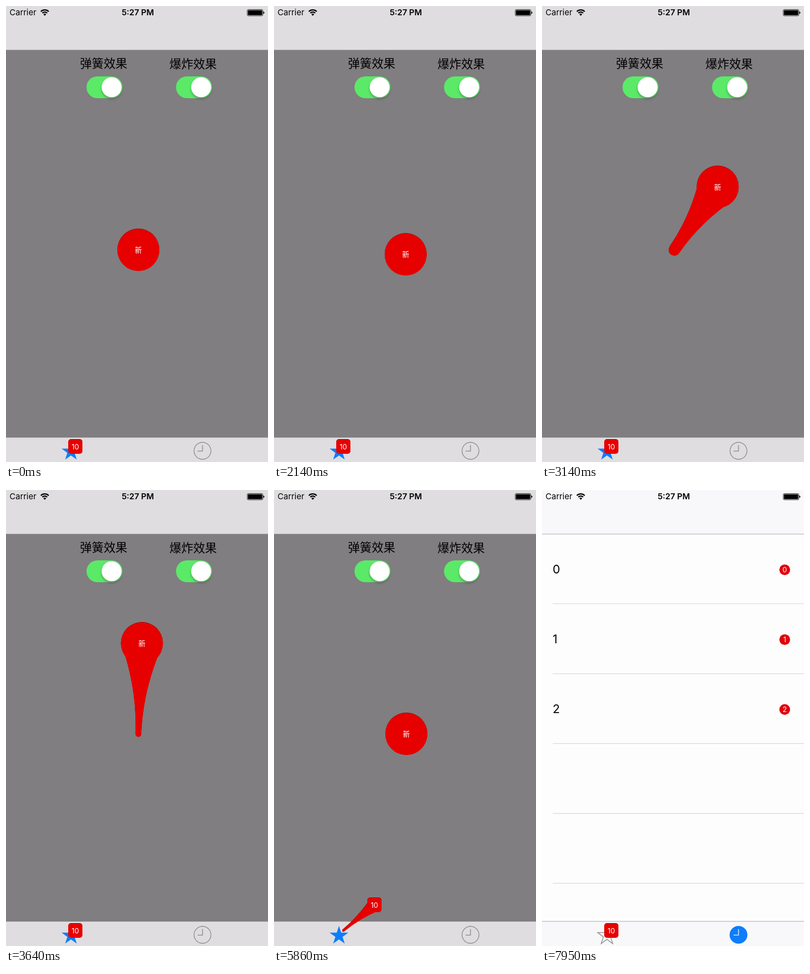
These frames come from a looping animation (480x836 px, 8 s). An HTML page:

```html
<!DOCTYPE html>
<html lang="zh">
<head>
<meta charset="utf-8">
<style>
html, body { margin: 0; height: 100%; overflow: hidden; background: #807e80; }
svg { display: block; width: 100vw; height: 100vh; }
text { font-family: Inter, "Noto Sans CJK SC", "Noto Sans CJK", sans-serif; }
.label { font-size: 21.7px; }
.small { font-size: 13px; fill: #fff; text-anchor: middle; }
.thin { font-weight: 300; }
.red { fill: #e60000; filter: drop-shadow(.6px -.6px 0 #a80000); }
.knob { fill: #fff; filter: drop-shadow(0 3px 2px #0004); }
.icon { fill: none; stroke: #929194; stroke-width: 1.4; }
.on { fill: #0e7dfb; }
</style>
</head>
<body>
<svg viewBox="0 0 480 836">
  <defs>
    <path id="star"/>
    <g id="switch">
      <rect width="66" height="40" rx="20" fill="#5bea68"/>
      <circle class="knob" cx="46" cy="20" r="18.3"/>
    </g>
    <path id="hands" d="M360 805V816H351" fill="none" stroke-width="1.5"/>
  </defs>

  <g id="home">
    <rect width="480" height="836" fill="#807e80"/>
    <path d="M0 0H480V80.5H0ZM0 791.3H480V836H0Z" fill="#dfdde0"/>
    <text class="label" x="135.5" y="112.5">弹簧效果</text>
    <text class="label" x="299.5" y="113.5">爆炸效果</text>
    <use href="#switch" x="147.5" y="129"/>
    <use href="#switch" x="311.5" y="129"/>
    <use href="#star" class="on"/>
    <circle class="icon" cx="360" cy="815.5" r="15.5"/>
    <use href="#hands" stroke="#929194"/>
    <g id="ball">
      <path class="red"/>
      <text class="small thin" y="4.7">新</text>
    </g>
  </g>

  <g id="list">
    <rect width="480" height="836" fill="#fefdfe"/>
    <path d="M0 0H480V80H0ZM0 791H480V836H0Z" fill="#f8f7fa"/>
    <path d="M0 80.8H480M0 790.8H480" stroke="#c4c3c7" stroke-width="1.4"/>
    <g id="rows"></g>
    <use href="#star" class="icon"/>
    <circle class="on" cx="360" cy="815.5" r="16.3"/>
    <use href="#hands" stroke="#cfe5ff"/>
  </g>

  <g id="badge">
    <path class="red"/>
    <text class="small" y="4.7">10</text>
  </g>

  <text x="6.5" y="17.3" font-size="15">Carrier</text>
  <text x="241.5" y="17.3" font-size="15" font-weight="600" text-anchor="middle">5:27 PM</text>
  <g fill="none" stroke="#000" stroke-width="2.2">
    <path d="M63.8 10.2a10.2 10.2 0 0 1 14.4 0M66.5 13a6.4 6.4 0 0 1 9 0"/>
    <path d="M71 18l-2.6-2.7a3.7 3.7 0 0 1 5.2 0Z" fill="#000" stroke="none"/>
  </g>
  <rect x="442" y="6.5" width="28.5" height="11.5" rx="2" fill="none" stroke="#000" stroke-width=".8"/>
  <rect x="443.2" y="7.7" width="26.1" height="9.1" rx="1"/>
  <path d="M471.5 10a2.3 2.3 0 0 1 0 4.5Z"/>
</svg>

<script>
const $ = id => document.getElementById(id);
const LOOP = 8000, SWITCH = 7200;

const points = Array.from({ length: 10 }, (_, i) => {
  const a = i * Math.PI / 5, r = i % 2 ? 6.9 : 18;
  return `${119 + r * Math.sin(a)} ${817 - r * Math.cos(a)}`;
});
$('star').setAttribute('d', `M${points.join('L')}Z`);

let rows = '';
for (let i = 0; i < 5; i++) {
  const y = 208.6 + i * 128.1;
  rows += `<path d="M19.5 ${y}H480" stroke="#dfdee3" stroke-width="1.5"/>`;
  if (i < 3) rows += `<text class="label" x="19.5" y="${y - 56}">${i}</text>
    <circle cx="444.7" cy="${y - 62.4}" r="9.8" fill="#e0000a"/>
    <text class="small" x="444.7" y="${y - 57.7}">${i}</text>`;
}
$('rows').innerHTML = rows;

// Each drag follows [time, dx, dy] waypoints until it is dropped.
const ball = {
  node: $('ball'), x: 242.5, y: 447.5, r: 38.5, minR: 4, corner: 38.5,
  drags: [
    { drop: 1950, path: [[600, 0, 0], [1500, -16, 109]] },
    { drop: 4000, path: [[2800, 0, 0], [3295, 103, -150], [3640, 6.5, -166]] }
  ]
};
const badge = {
  node: $('badge'), x: 127, y: 808, r: 13, minR: 2, corner: 5,
  drags: [{ drop: 6400, path: [[5100, 0, 0], [5860, 57, -47]] }]
};

const smooth = p => p * p * (3 - 2 * p);

function follow(path, t) {
  const i = path.findIndex(p => p[0] > t);
  if (i < 0) return path.at(-1).slice(1);
  const [t0, x0, y0] = path[i - 1], [t1, x1, y1] = path[i];
  const p = smooth((t - t0) / (t1 - t0));
  return [x0 + (x1 - x0) * p, y0 + (y1 - y0) * p];
}

// Damped swing back to rest after the drop.
function spring(ms) {
  const s = ms / 1000;
  return s > 1 ? 0 : Math.exp(-7 * s) * Math.cos(26.2 * s);
}

const circle = (x, y, r) => `M${x - r} ${y}a${r} ${r} 0 1 1 ${2 * r} 0a${r} ${r} 0 1 1 ${-2 * r} 0Z`;

function roundBox(r, c) {
  const s = 2 * (r - c), arc = (x, y) => `a${c} ${c} 0 0 1 ${x} ${y}`;
  return `M${c - r} ${-r}h${s}${arc(c, c)}v${s}${arc(-c, c)}h${-s}${arc(-c, -c)}v${-s}${arc(c, -c)}Z`;
}

// Neck from the shrinking anchor at (-dx, -dy) to the body at the origin,
// wound clockwise like the other outlines so that they merge.
function neck({ r, minR }, dx, dy) {
  const d = Math.hypot(dx, dy);
  if (d < 1) return '';
  const a = Math.max(minR, r - d * 0.2), nx = dy / d, ny = -dx / d;
  const at = (k, q) => `${-dx * k + nx * q} ${-dy * k + ny * q}`;
  return `M${at(1, a)}Q${at(.5, a)} ${at(0, r)}L${at(0, -r)}Q${at(.5, -a)} ${at(1, -a)}Z` + circle(-dx, -dy, a);
}

function place(item, t) {
  const drag = item.drags.findLast(d => t >= d.path[0][0]);
  const held = drag && t < drag.drop;
  const k = !drag || held ? 1 : spring(t - drag.drop);
  const [dx, dy] = drag ? follow(drag.path, t).map(v => v * k) : [0, 0];
  item.node.setAttribute('transform', `translate(${item.x + dx} ${item.y + dy})`);
  item.node.firstElementChild.setAttribute('d',
    roundBox(item.r, item.corner) + (held ? neck(item, dx, dy) : ''));
}

function draw(now) {
  const t = now % LOOP;
  $('home').style.display = t < SWITCH ? '' : 'none';
  $('list').style.display = t < SWITCH ? 'none' : '';
  place(ball, t);
  place(badge, t);
}

const begin = performance.now();
function tick() {
  draw(performance.now() - begin);
  requestAnimationFrame(tick);
}
tick();
</script>
</body>
</html>
```
